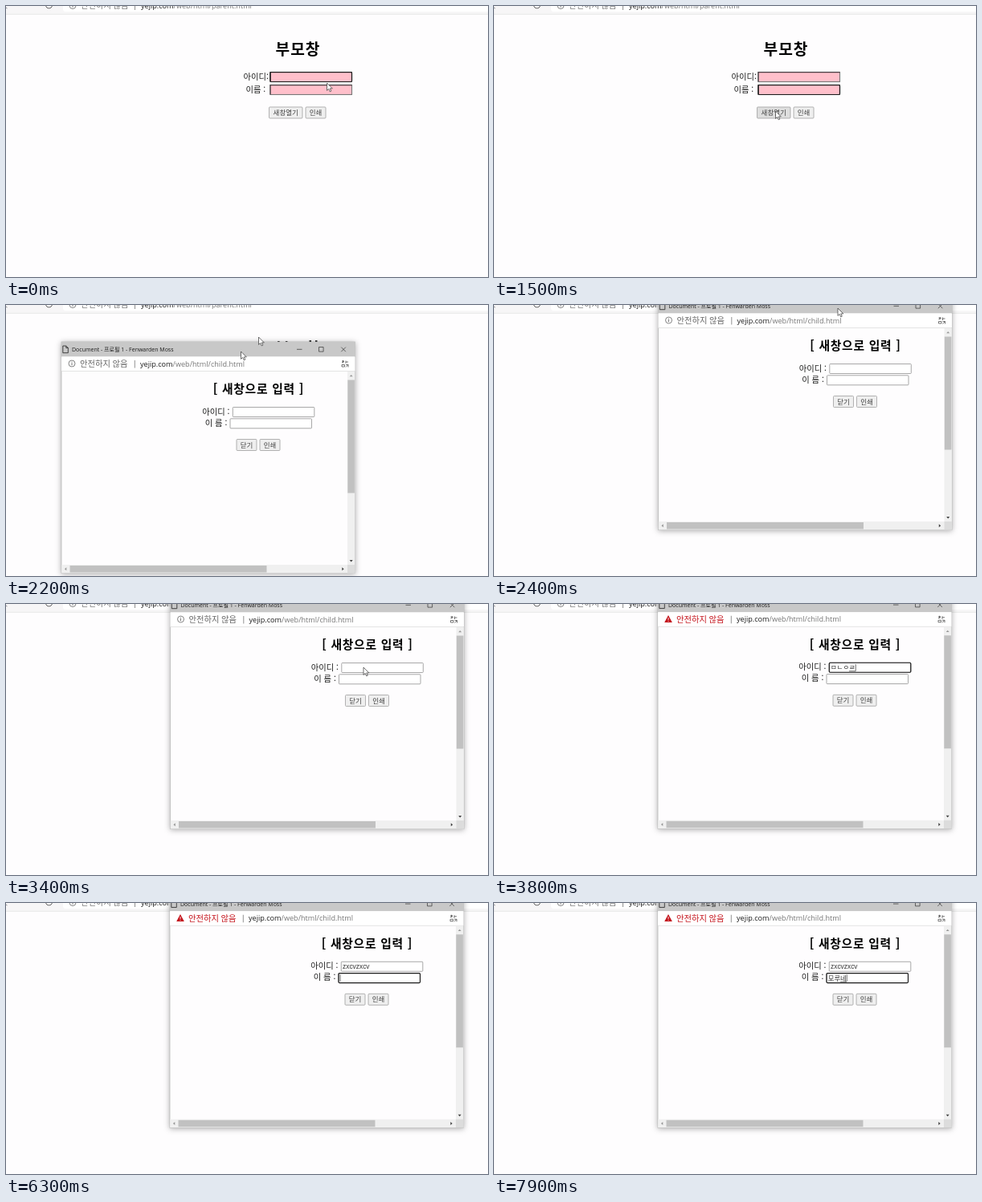
Write an HTML page that moves like this. It is 600x338 px and loops after 8 s.

```html
<!DOCTYPE html>
<html lang="ko">
<head>
<meta charset="utf-8">
<style>
html, body { margin: 0; width: 100%; height: 100%; overflow: hidden; background: #fefdfe; }
svg { display: block; width: 600px; height: 338px; }
text { font-family: "Noto Sans CJK KR", "Noto Sans CJK", sans-serif; fill: #1c1c1c; white-space: pre; }
.ui { font-family: "Open Sans", "Noto Sans CJK KR", "Noto Sans CJK", sans-serif; }
.in { font-family: "Liberation Sans", "Noto Sans CJK KR", "Noto Sans CJK", sans-serif; fill: #333; }
.bold { font-weight: 700; fill: #000; letter-spacing: .05em; }
.mid { text-anchor: middle; }
.btn { fill: #444; }
#popup { filter: drop-shadow(0 1px 3.5px rgba(0,0,0,.32)); }
</style>
</head>
<body>
<svg id="stage" viewBox="0 0 600 338"></svg>
<script>
const LOOP = 8000, STEP = 100;
const GRAB = [223.5, 12];
const PATH = [
  [0, 399.5, 96], [100, 398, 92], [300, 383, 51], [500, 383, 101], [900, 353, 130],
  [1200, 353, 130], [1500, 350.5, 131], [1600, 350.5, 131], [1900, 219, 84], [2100, 219, 84],
  [2200, 292.5, 58], [2400, 428, 4], [2600, 428, 4], [3000, 498, 108], [3400, 445, 79]
];
const ID_TYPING = [
  [0, ''], [3600, 'ㅁ'], [3700, 'ㅁㄴㅇ'], [3800, 'ㅁㄴㅇㄹ'], [5600, ''],
  [5700, 'z'], [5800, 'zxc'], [5900, 'zxcvz'], [6000, 'zxcvzxcv']
];
const NAME_TYPING = [
  [0, ''], [7300, 'ㅁ'], [7400, '모'], [7500, '몰'], [7600, '모루'],
  [7700, '모룬'], [7900, '모루네']
];

const text = (x, y, size, str, cls = '', extra = '') =>
  `<text x="${x}" y="${y}" font-size="${size}" class="${cls}" ${extra}>${str}</text>`;
const rect = (x, y, w, h, fill, extra = '') =>
  `<rect x="${x}" y="${y}" width="${w}" height="${h}" fill="${fill}" ${extra}/>`;
const line = (d, color, width = 1, extra = '') =>
  `<path d="${d}" fill="none" stroke="${color}" stroke-width="${width}" ${extra}/>`;
const button = (x, y, w, h, label, id = '') =>
  rect(x + .5, y + .5, w - 1, h - 1, '#efefef', `id="${id}" rx="1" stroke="#a0a0a0" stroke-width=".8"`) +
  text(x + w / 2, y + h / 2 + 3, 8.5, label, 'mid btn');
const ring = (id, x, y, w, h) =>
  rect(x, y, w, h, 'none', `id="${id}" rx="1.2" stroke="#1c1c1c" stroke-width="1.2"`);
const pinkField = (y, id) =>
  rect(329, y + .5, 101.5, 12, '#ffc0cb', 'stroke="#777" stroke-width="1.1"') +
  line(`M329 ${y + 12.5}V${y + .7}H430.5`, '#4a4045', 1.2) +
  ring(id, 329, y + .5, 101.5, 12);
const whiteField = (x, y, key) =>
  rect(x + .5, y + .5, 101.5, 12, '#fff', 'stroke="#929292" stroke-width=".8" rx=".8"') +
  ring(key + 'Ring', x + .5, y + .5, 101.5, 12) +
  text(x + 2.2, y + 9.5, 8.4, '', 'in', `id="${key}Text"`) +
  rect(0, y + 10.7, 8, .7, '#333', `id="${key}Mark"`) +
  rect(0, y + 2.3, .7, 8.6, '#333', `id="${key}Caret"`);
const address = (x, y, page) =>
  text(x, y, 9.1, `yejip.com<tspan fill="#777">/web/html/${page}.html</tspan>`, 'ui');
const info = (x, y) =>
  `<circle cx="${x}" cy="${y}" r="4" fill="none" stroke="#666" stroke-width=".8"/>` +
  line(`M${x} ${y - .8}v3M${x} ${y - 2.4}v.9`, '#666', .9);
const arrow = id =>
  `<path id="${id}" d="M0 0V9.4L2.2 7.4L3.7 10.8L5.3 10.1L3.8 6.9H6.8Z" fill="#fff" stroke="#333" stroke-width=".7"/>`;

const parent =
  rect(0, 0, 600, 10, '#f7f6f7') +
  rect(71, -20, 560, 27, '#fff', 'rx="3"') +
  line('M0 10.3H600', '#e4e4e4', .8) +
  line('M49.5 0A4.2 4.2 0 0 0 57.5 0', '#555', .9) +
  line('M0 2L1.5 3', '#777', .8) +
  info(83, -.5) +
  text(93, 3, 10.3, '안전하지 않음', 'ui', 'style="fill:#777"') +
  line('M160.5 0V5', '#777', .8) +
  address(168, 3, 'parent') +
  text(363.5, 60.6, 19.2, '부모창', 'bold mid') +
  text(295.5, 91.6, 10.3, '아이디:') +
  text(298.5, 108.2, 10.3, '이름 :') +
  pinkField(82, 'ring1') + pinkField(98, 'ring2') +
  button(327, 125.5, 42.5, 15, '새창열기', 'open') +
  button(372.5, 125.5, 26, 15, '인쇄');

const popup =
  rect(0, 0, 365.5, 288.5, '#fefdfe', 'stroke="#b4b4b4" stroke-width=".7"') +
  rect(0, 0, 365.5, 18.5, '#c8c8c8') +
  line('M1.8 5H5.8L8.3 7.5V13.7H1.8ZM5.8 5V7.5H8.3', '#333', .9) +
  text(13, 12.3, 7, 'Document - 프로필 1 - Fenwarden Moss', 'ui') +
  line('M293 9.3h6.5M320.5 6.5h5.6v5.6h-5.6zM348.3 6.6l5.6 5.6m0-5.6l-5.6 5.6', '#333', .7) +
  rect(0, 18.5, 365.5, 18, '#fff') +
  line('M0 36.5H365.5', '#ddd', .8) +
  `<g id="safe">${info(13, 27)}</g>` +
  '<path id="warn" d="M13 22.3L17.8 31.3H8.2Z" fill="#c4121a"/>' +
  line('M13 25.3v3M13 29.2v1', '#fff', .9, 'id="bang"') +
  text(23, 30.8, 10.3, '안전하지 않음', 'ui', 'id="status"') +
  line('M91.3 23V32.5', '#777', .8) +
  address(98, 30.7, 'child') +
  line('M349 24h3m-1.5-1v3m-1.5 0l3-1.5M354 23.5v3.5m0-2h3M349 28.5h3.5v2.5h-3.5zM354 28.5h3v3m-3 0l3-3', '#555', .8) +
  text(245.4, 64, 14.8, '[ 새창으로 입력 ]', 'bold mid') +
  text(175.3, 90.6, 10.3, '아이디 :') +
  text(178.7, 104.6, 10.3, '이 름 :') +
  whiteField(212.8, 81, 'id') + whiteField(209.5, 95.3, 'name') +
  button(217.5, 121, 26, 15, '닫기') +
  button(246.5, 121, 26, 15, '인쇄') +
  rect(356, 37, 9.3, 251.3, '#f0f0f0') +
  rect(.3, 278, 356, 10.3, '#f0f0f0') +
  rect(356, 278, 9.3, 10.3, '#dcdcdc') +
  rect(356.3, 47.5, 8.6, 141, '#c1c1c1') +
  rect(10.5, 279, 245, 8.5, '#c1c1c1') +
  '<path d="M358.7 43.3l2-2.4 2 2.4zM6.3 281.2l-2.4 2 2.4 2z" fill="#999"/>' +
  '<path d="M358.7 272l2 2.4 2-2.4zM349.3 281.2l2.4 2-2.4 2z" fill="#444"/>';

document.getElementById('stage').innerHTML =
  rect(0, 0, 600, 338, '#fefdfe') + parent + `<g id="popup">${popup}</g>` + arrow('trail') + arrow('cursor');

const $ = id => document.getElementById(id);
const show = (id, on) => $(id).setAttribute('visibility', on ? 'inherit' : 'hidden');
const move = (id, x, y) => $(id).setAttribute('transform', `translate(${x} ${y})`);
const lookup = (list, t) => list.filter(k => k[0] <= t).pop()[1];

function pointer(t) {
  const i = PATH.findIndex(k => k[0] > t);
  if (i < 0) return PATH[PATH.length - 1].slice(1);
  const [t0, x0, y0] = PATH[i - 1], [t1, x1, y1] = PATH[i];
  const p = (t - t0) / (t1 - t0);
  return [x0 + (x1 - x0) * p, y0 + (y1 - y0) * p];
}

function updateField(key, value, focused, caretOn, composing) {
  const label = $(key + 'Text');
  if (label.textContent !== value) label.textContent = value;
  const start = +label.getAttribute('x');
  const end = start + (value ? label.getComputedTextLength() : 0);
  show(key + 'Ring', focused);
  show(key + 'Caret', focused && caretOn);
  $(key + 'Caret').setAttribute('x', end);
  show(key + 'Mark', focused && composing && value);
  $(key + 'Mark').setAttribute('x', end - 7.8);
}

function draw(time) {
  const t = Math.floor(time / STEP) * STEP;
  const [x, y] = pointer(t);
  move('cursor', x, y);
  show('cursor', t < 3600);
  show('trail', t === 2200);
  move('trail', 314.5, 40);

  show('ring1', t < 500);
  show('ring2', t >= 500 && t < 1700);
  $('open').setAttribute('fill', t >= 800 && t < 1700 ? '#dedede' : '#efefef');

  const [wx, wy] = pointer(Math.min(Math.max(t, 2100), 2400));
  const settle = t >= 3500 ? .5 : 0;
  move('popup', wx - GRAB[0] - settle, wy - GRAB[1] - settle / 2);
  show('popup', t >= 1700);

  const edited = t >= 3600;
  show('safe', !edited);
  show('warn', edited);
  show('bang', edited);
  $('status').style.fill = edited ? '#c4121a' : '#666';

  updateField('id', lookup(ID_TYPING, t), t >= 3500 && t < 6100, true, t < 4400);
  updateField('name', lookup(NAME_TYPING, t), t >= 6100, t < 6500 || t >= 6800, true);
}

function tick(now) {
  draw(now % LOOP);
  requestAnimationFrame(tick);
}
draw(0);
requestAnimationFrame(tick);
</script>
</body>
</html>
```
